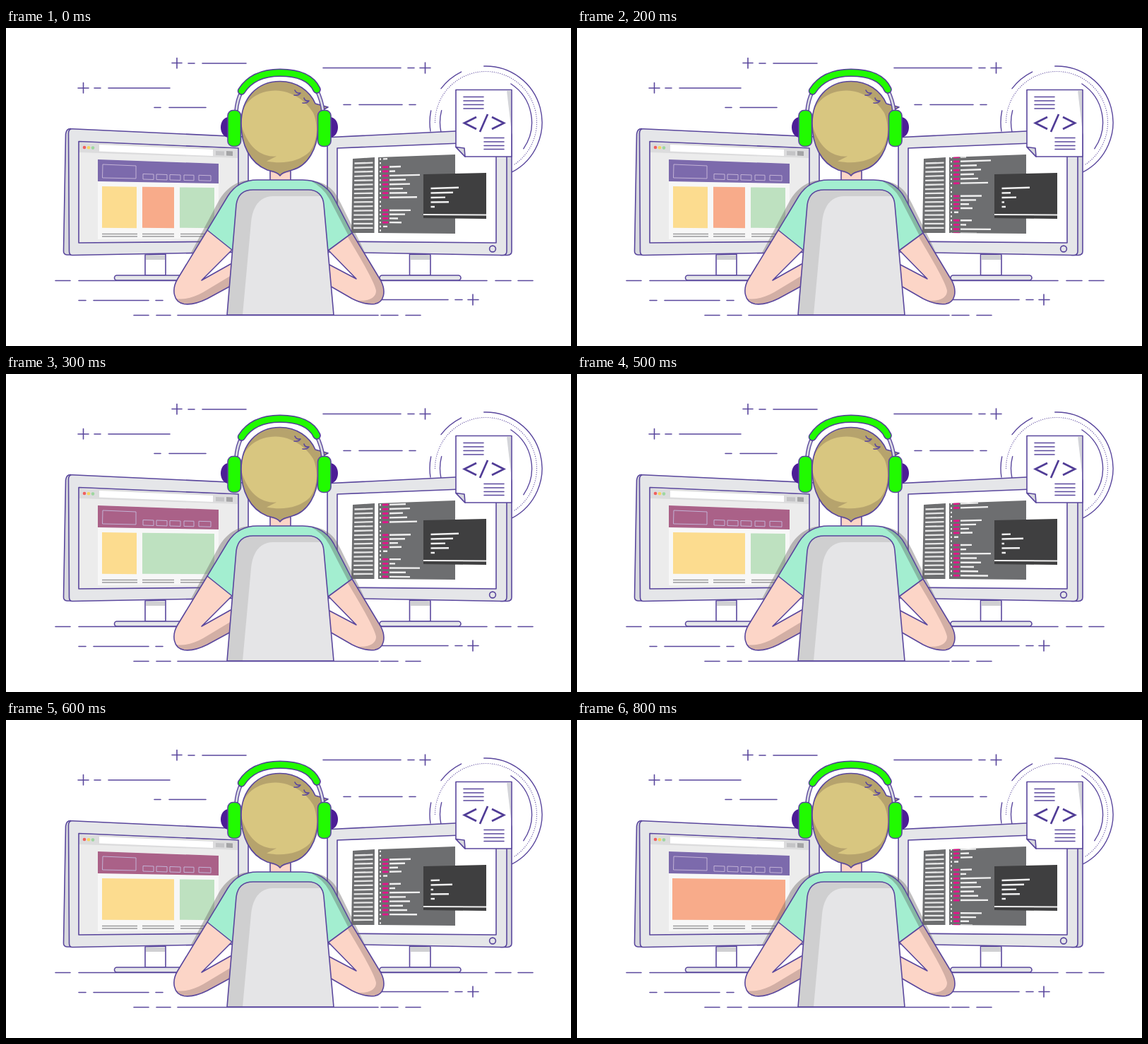
An HTML page that plays this animation: 800 px wide and 450 px high, repeating every 900 ms.

```html
<!DOCTYPE html>
<html lang="en">
<head>
<meta charset="utf-8">
<title>Developer at work</title>
<style>
  html, body { margin: 0; width: 100%; height: 100%; overflow: hidden; background: #fff; }
  svg { display: block; width: 100%; height: 100%; }
  .ink { stroke: #5a479d; stroke-width: 1.6; stroke-linejoin: round; stroke-linecap: round; }
  .none { fill: none; }
  .case { fill: #e5e6e9; }
  .side { fill: #d8d9de; }
  .skin { fill: #fcd5c7; }
  .tan { fill: #d2afa5; }
  .mint { fill: #a3eed0; }
  .green { fill: #21fb00; }
  .cup { fill: #4c1d96; }
  .grey { fill: #6d6e70; }
  .white { fill: #fff; }
</style>
</head>
<body>
<svg viewBox="0 0 800 450">
  <defs>
    <clipPath id="pane"><path d="M527 183L636 179V291L527 290Z"/></clipPath>
    <path id="hair" d="M388 209C384 203 376 203 370 201C345 191 333 165 333 135C333 100 355 75.500 388 75.500C412 75.500 430 89 438 107L456 112L445 118C442 125 443 131 442 142C441 170 428 195 405 201C398 203 391 204 388 209Z"/>
    <path id="band" d="M333.500 89C345 71 365 63.300 388 63.300C412 63.300 432 70 440 87"/>
    <path id="rods" d="M326 118Q327 102 334 89M449 118Q447 102 440 88"/>
  </defs>

  <!-- backdrop -->
  <path class="ink none" d="M235 49.500H249M242 42.500V57M258 50H267M278 50H340
    M102 85H117M109.500 77.500V92M125 85H134M145 85H232M210 112.500H219M231 112.500H283
    M449 56.500H559M569 56.500H578M586 56.500H601M593.500 49V64M478 108.500H488M500 108.500H561M571 108.500H580
    M70 357.500H91M103 357.500H245M530 357.500H681M693 357.500H715M725 357.500H746
    M103 385.500H113M124 385.500H202M212 385.500H222M530 384.500H626M636 384.500H646M654 384.500H669M661 377V392
    M181 406.500H202M213 406.500H233M243 406.500H527M531 406.500H555M566 406.500H587"/>
  <g id="rings" class="ink none" style="stroke-width: 1.4"></g>

  <!-- left monitor -->
  <path class="ink side" d="M92 142.500Q85.500 142 84.500 150L81.500 316Q81.500 320.500 86.500 321H95Z"/>
  <path class="ink case" d="M88.500 149Q88.500 142.500 94 142.700L337 154Q343 155 343 161V317L94 321.500Q89.500 321.500 89.500 316Z"/>
  <path class="ink" fill="#ececec" d="M103 160.500L329 170V302L103 304Z"/>
  <path fill="#dcdcdd" d="M104 162L328 171V184L104 176Z"/>
  <path class="white" d="M132 165L293 172V181L132 174.500Z"/>
  <path fill="#c4c4c6" d="M297 174L309 174.500V180.500L297 180Z"/>
  <path fill="#a4a4a6" d="M312 174L321 174.500V181L312 180.500Z"/>
  <circle cx="111" cy="169" r="2.300" fill="#f0605e"/>
  <circle cx="117" cy="169.300" r="2.300" fill="#f6d55f"/>
  <circle cx="123" cy="169.600" r="2.300" fill="#9ed6a0"/>
  <path fill="#f7f7f7" d="M130 186L301 192V298L130 299Z"/>
  <path id="header" d="M130 186L301 192V220L130 217Z"/>
  <path class="none" stroke="#c3b3d6" d="M137 193L184 195V213L136.500 212Z
    M194 206.500L209 207V214.500L194 214ZM213 207L228 207.500V215L213 214.500Z
    M232 207.500L247 208V215.500L232 215ZM252 208L266 208.300V215.800L252 215.500Z
    M273 208.300L290 208.800V216.300L273 215.800Z"/>
  <g id="cards"></g>
  <path stroke="#9b9b9d" stroke-width="1.600" d="M136 291.500H186M136 295H186M193 291.500H238M193 295H238M247 291.500H295M247 295H295"/>
  <path class="ink white" d="M197 321V350H226V320Z"/>
  <path fill="#cfcfd2" d="M198 321.500H225V328H198Z"/>
  <rect class="ink case" x="153.500" y="350" width="116" height="7" rx="3.500"/>

  <!-- right monitor -->
  <path class="ink side" d="M700 145Q716 143 716 152V316Q716 321 710 321.500H700Z"/>
  <path class="ink case" d="M455 162Q455 155 461 154.500L703 142.700Q709 143 709 150V316Q709 321.500 703 321.500L455 317Z"/>
  <path class="ink white" d="M469 170L694 161V304L469 302Z"/>
  <circle class="ink none" cx="689" cy="312.500" r="4.400"/>
  <path class="ink white" d="M571.500 320V350H601V321Z"/>
  <path fill="#cfcfd2" d="M572.500 321H600V328H572.500Z"/>
  <rect class="ink case" x="529" y="350" width="115" height="7" rx="3.500"/>

  <path class="grey" d="M491 185L522 183L521.500 290L489 290Z"/>
  <path id="list" stroke="#e6e6e6" stroke-width="2.300"/>
  <path class="grey" d="M527 183L636 179V291L527 290Z"/>
  <g clip-path="url(#pane)">
    <path id="keys" stroke="#e0168a" stroke-width="2.800"/>
    <path id="code" stroke="#f0f0f0" stroke-width="2.400"/>
  </g>
  <path fill="#3f3f40" d="M591 207L680 205V270L591 269Z"/>
  <path stroke="#f0f0f0" stroke-width="2" d="M591 264L680 264.500"/>
  <path id="shell" stroke="#f0f0f0" stroke-width="2.400"/>

  <!-- code sheet -->
  <path class="ink white" d="M637 87.500H716V182H650L637 168.500Z"/>
  <path fill="#d3d4d9" d="M709 88.500H715V140Z"/>
  <path class="ink side" d="M637 168.500L649 170L650 182Z"/>
  <path class="ink" d="M648 97.500H676M648 103H676M648 108.500H676M648 114H676
    M677 155.500H705M677 161H705M677 166.500H705M677 171.500H705"/>
  <path class="none" stroke="#503c96" stroke-width="2.700" d="M666 126L649 134.500L666 143M671 147L682 122M688 126L705 134.500L688 143"/>

  <!-- cast shadow -->
  <path fill="#6d6868" fill-opacity=".42" d="M345 215C322 217 309 231 301 245L262 318L268 317L318 235ZM440 217C462 223 468 236 474 248L509 319L492 292L462 238Z"/>

  <!-- body -->
  <path class="ink skin" d="M374 195V216H403V195Z"/>
  <path class="tan" d="M375 198H402V204Q392 205 388 210Q384 205 375 204Z"/>
  <path class="skin" d="M285 286L243 355C234 370 237 388 252 390.500C263 392 275 388 285 383L320 364V333L277 357L320 314Z"/>
  <path class="tan" d="M240 383C255 385 266 381 279 374L319 350V364L285 383C268 391 248 396 240 383Z"/>
  <path class="ink none" d="M285 286L243 355C234 370 237 388 252 390.500C263 392 275 388 285 383L320 364M318 334L277 357L320 314"/>
  <path class="skin" d="M490 290L531 358C538 372 536 388 522 390.500C511 392 500 388 490 383L457 364V334L496 355L456 314Z"/>
  <path class="tan" d="M490 290L531 358C538 372 536 388 522 390.500C513 392 503 389 494 385C510 388 524 383 524 372C523 362 504 329 484 296Z"/>
  <path class="ink none" d="M490 290L531 358C538 372 536 388 522 390.500C511 392 500 388 490 383L457 364M458 335L496 355L456 314"/>
  <path class="mint" d="M285 286L314 238C324 222 338 215 356 215H420C440 215 455 224 464 240L490 290L456 315H320Z"/>
  <path fill="#86b8a3" d="M430 215.500C446 217 457 227 464 240L490 290L485 294L458 242Q450 226 430 215.500Z"/>
  <path class="ink none" d="M320 314L285 286L314 238C324 222 338 215 356 215H420C440 215 455 224 464 240L490 290L456 315"/>

  <!-- chair -->
  <path fill="#cfcfd0" d="M313 406L326 250C328 236 336 229 350 229H428C441 229 449 237 450 250L464 406Z"/>
  <path fill="#e5e5e7" d="M335 406L347 275C349 252 360 238 378 238H447Q449 243 450 250L464 406Z"/>
  <path class="ink none" d="M313 406L326 250C328 236 336 229 350 229H428C441 229 449 237 450 250L464 406Z"/>

  <!-- head -->
  <path class="cup" d="M316 126C300 126 300 155 316 155ZM458 126C474 126 474 155 458 155Z"/>
  <use href="#hair" fill="#b6a36d"/>
  <path fill="#d8c680" d="M333 128C335 104 356 88.500 382 88.500C404 89 424 102 435 120C442 136 442 160 430 175C415 189 393 193 369 188.500L383 181.500C364 183 350 172 342 158C336 147 332 138 333 128Z"/>
  <use href="#hair" class="ink none"/>
  <path class="ink none" d="M409 88Q411 93 417 92Q414 96 408 95M422 99Q423 104 429 103Q426 107 420 106"/>

  <!-- headphones -->
  <g class="none">
    <use href="#rods" stroke="#5a479d" stroke-width="5.600"/>
    <use href="#rods" stroke="#d9d9e2" stroke-width="2.800"/>
  </g>
  <g class="none" stroke-linecap="round">
    <use href="#band" stroke="#503c96" stroke-width="11.600"/>
    <use href="#band" stroke="#21fb00" stroke-width="8.600"/>
  </g>
  <rect class="ink green" x="314" y="116.500" width="18.500" height="51" rx="7.500"/>
  <rect class="ink green" x="441.500" y="116.500" width="18.500" height="51" rx="7.500"/>
</svg>

<script>
const $ = id => document.getElementById(id);
const STEP = 100, LOOP = 900;

const YELLOW = '#fcdc8f', ORANGE = '#f8ab8a', GREEN = '#bee1c0';
const PURPLE = '#7c6aac', MAUVE = '#aa6188';

// x where each code line ends; 0 = empty, 1 = closing bracket
const blocks = [
  { top: 0, pitch: 6.13, ends: [559, 551, 586, 566, 572, 562, 568, 582, 0, 0] },
  { top: 61, pitch: 5.7, ends: [573, 565, 555, 560, 1, 0] }
];
const PERIOD = 95.2;

const layouts = [
  [PURPLE, [136, 185, YELLOW], [193, 238, ORANGE], [246, 295, GREEN]],
  [MAUVE, [136, 185, YELLOW], [193, 295, GREEN]],
  [MAUVE, [136, 238, YELLOW], [246, 295, GREEN]],
  [PURPLE, [135, 295, ORANGE]]
];
const layoutAt = [0, 0, 0, 1, 1, 2, 2, 3, 3];

const shells = [
  [641, 633, 622, 627, 607],
  [641, 614, 622, 605, 607],
  [614, 632, 605, 627, 607]
];
const shellAt = [0, 1, 1, 0, 0, 2, 2, 2, 0];

function arc(r, from, to) {
  const p = a => {
    const t = a * Math.PI / 180;
    return `${679.5 + r * Math.cos(t)} ${133.5 + r * Math.sin(t)}`;
  };
  return `M${p(from)}A${r} ${r} 0 ${+(to - from > 180)} 1 ${p(to)}`;
}

function drawStatic() {
  $('rings').innerHTML =
    `<path d="${arc(79.5, -92, 62)}${arc(79.5, -143, -116)}${arc(79.5, 171, 192)}${arc(65, -57, 35)}${arc(65, 168, 195)}"/>` +
    `<path stroke-dasharray=".1 2.800" stroke-width="1.200" d="${arc(72, -180, 56)}"/>`;
  let d = '';
  for (let i = 0; i < 16; i++) {
    const y = 191.5 + i * 6.1;
    d += `M${493.5 - i * 0.1} ${y}L519.5 ${y - 0.8 + i * 0.05}`;
  }
  $('list').setAttribute('d', d);
}

function drawCode(step) {
  let keys = '', text = '';
  const row = (y, end) => {
    const slope = (y - 183) * 0.00042 - 0.035;
    const bar = (a, b) => `M${a} ${y + slope * (a - 527)}L${b} ${y + slope * (b - 527)}`;
    text += bar(529, 531);
    if (end === 1) text += bar(534, 540);
    if (end > 1) {
      keys += bar(533, 541.5);
      text += bar(543, end);
    }
  };
  for (let copy = -1; copy < 3; copy++) {
    const start = 197 - 10 * step + copy * PERIOD;
    for (const { top, pitch, ends } of blocks)
      ends.forEach((end, i) => row(start + top + i * pitch, end));
  }
  $('keys').setAttribute('d', keys);
  $('code').setAttribute('d', text);
}

function draw(step) {
  const [head, ...cards] = layouts[layoutAt[step]];
  $('header').setAttribute('fill', head);
  const edge = x => 224 + (x - 136) * 0.013;
  $('cards').innerHTML = cards.map(([a, b, fill]) =>
    `<path fill="${fill}" d="M${a} ${edge(a)}L${b} ${edge(b)}V283.300L${a} 282.700Z"/>`).join('');
  $('shell').setAttribute('d', shells[shellAt[step]].map((x, i) => {
    const y = 227 + i * 6.5;
    return `M601.500 ${y}L${x} ${y - (x - 601) * (0.03 - i * 0.006)}`;
  }).join(''));
  drawCode(step);
}

let last = -1;
function tick() {
  const step = Math.floor(performance.now() % LOOP / STEP);
  if (step !== last) draw(last = step);
  requestAnimationFrame(tick);
}

drawStatic();
tick();
</script>
</body>
</html>
```
